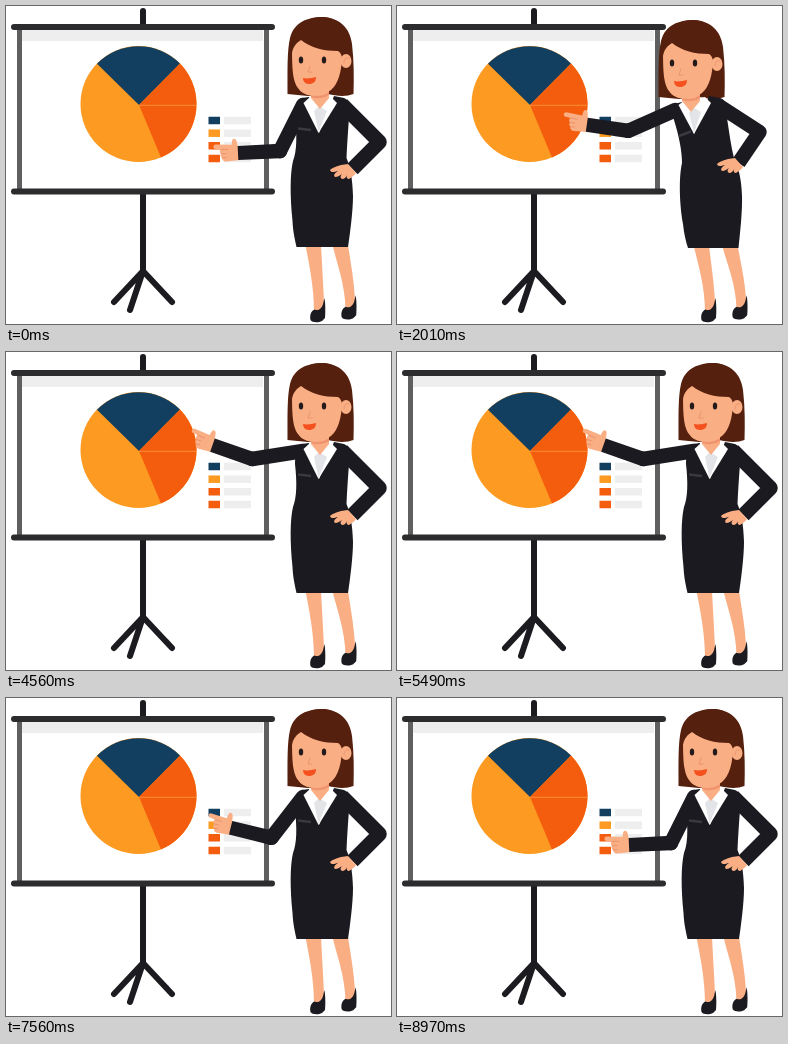
An HTML page for the animation above (9 s loop, 385 by 318 pixels).

```html
<!DOCTYPE html>
<html lang="en">
<head>
<meta charset="utf-8">
<title>Presenter</title>
<style>
@property --lean { syntax: "<number>"; inherits: false; initial-value: 0; }
@property --turn { syntax: "<angle>"; inherits: false; initial-value: 0deg; }

html, body { margin: 0; width: 100%; height: 100%; overflow: hidden; background: #fff; }
svg { display: block; width: 385px; height: 318px; }

.suit { fill: #1a1a20; }
.skin { fill: #faae84; }
.hair { fill: #55200e; }
.sleeve { fill: none; stroke: #1a1a20; stroke-width: 14.5; stroke-linejoin: round; }
.crease { fill: none; stroke: #e88f69; stroke-width: .8; stroke-linecap: round; }
.stand { fill: none; stroke: #2c2b2e; stroke-width: 6; stroke-linecap: round; stroke-linejoin: round; }
.legs { stroke: #1c1b20; }

.bend, .shift, .upper, .fore { animation: 9s ease-in-out infinite; }
.bend { d: var(--a); animation-name: bend; }
.shift { transform: translate(calc(var(--x) * var(--lean)), calc(var(--y) * var(--lean))); animation-name: shift; }
.upper, .fore { transform: rotate(var(--turn)); }
.upper { animation-name: upper; }
.fore { animation-name: fore; }
.eyes { transform-origin: 306px 54px; animation: blink 9s linear infinite; }

/* upright to leaning and back */
@keyframes bend {
  0%, 11.67%, 47.8%, 100% { d: var(--a); }
  20%, 37.8% { d: var(--b); }
}
@keyframes shift {
  0%, 11.67%, 47.8%, 100% { --lean: 0; }
  20%, 37.8% { --lean: 1; }
}
@keyframes upper {
  0%, 11.67% { --turn: -63.4deg; }
  20%, 37.8% { --turn: -23.8deg; }
  47.8% { --turn: -8.9deg; }
  80% { --turn: -8.9deg; animation-timing-function: ease-in; }
  84% { --turn: -52.2deg; animation-timing-function: ease-out; }
  88.9%, 100% { --turn: -63.4deg; }
}
@keyframes fore {
  0%, 11.67% { --turn: 60.7deg; }
  20%, 22.33% { --turn: 32deg; }
  37.8% { --turn: 24deg; }
  47.8% { --turn: 28.2deg; }
  80% { --turn: 28.2deg; animation-timing-function: ease-in; }
  84% { --turn: 65.9deg; animation-timing-function: ease-out; }
  88.9%, 100% { --turn: 60.7deg; }
}
@keyframes blink {
  0%, 69.4%, 70.6%, 100% { transform: scaleY(1); }
  70% { transform: scaleY(.1); }
}
</style>
</head>
<body>
<svg viewBox="0 0 385 318">
  <!-- board -->
  <path class="stand legs" d="M137 5V18M137 188V265L108 296M137 265L124 304M137 265L166 296"/>
  <path d="M16 24H257V182H16Z" fill="#fff"/>
  <path d="M16 24H257V35H16Z" fill="#eeeeef"/>
  <path d="M13.500 23V183M260.500 23V183" stroke="#5f5f60" stroke-width="5"/>
  <path class="stand" d="M8 21H266M8 185.500H266"/>

  <!-- chart -->
  <circle cx="132.5" cy="98" r="58" fill="#fd9a22"/>
  <path d="M133 99L91 57.800A58 58 0 0 1 174 57.500Z" fill="#123f5f"/>
  <path d="M133 99L174 57.500A58 58 0 0 1 155 151.500Z" fill="#f45d0e"/>
  <path d="M133 99.300H190" stroke="#fc9840" stroke-width=".8"/>

  <!-- legend -->
  <path d="M202.500 114.500h11.500" stroke="#123f5f" stroke-width="7.5"/>
  <path d="M202.500 127.200h11.500" stroke="#fd9a22" stroke-width="7.5"/>
  <path d="M202.500 139.800h11.500m-11.500 12.700h11.500" stroke="#f45d0e" stroke-width="7.5"/>
  <path d="M218 114.500h27m-27 12.700h27m-27 12.600h27m-27 12.700h27" stroke="#eeeeef" stroke-width="7.5"/>

  <!-- legs -->
  <path class="skin bend" style="--a:path('M299.5 239L315 239C316 258 317 275 318 296L317 306L308 306C308 280 303 258 299.5 239Z');
    --b:path('M296.5 239L312 239C314 258 317 275 318 296L317 306L308 306C308 280 301 258 296.5 239Z')"/>
  <path class="skin bend" style="--a:path('M326.5 239L342 239C345 258 348 275 349 293L348 303L339.5 303C339 278 331 258 326.5 239Z');
    --b:path('M325 239L340.5 239C344 258 348 275 349 293L348 303L339.5 303C339 278 330 258 325 239Z')"/>
  <path id="shoe" class="suit" d="M318.500 292C319.500 298 319.500 306 319 312L316 315C312 317 306 316.500 304.500 314C303.500 309 305 305 308.500 303.500C313 305.500 316.500 302 317.500 296Z"/>
  <use href="#shoe" x="31.2" y="-2.8"/>

  <!-- back of hair -->
  <g class="shift" style="--x:-20px;--y:3px">
    <path class="hair" d="M281.500 88C281.500 65 281 45 284 32C288 16 302 11 317 11C334 12 344 22 346 38C348 55 348 72 347.500 88C340 91 330 90 322 88L302 90Z"/>
  </g>

  <!-- body -->
  <path class="suit bend" style="--a:path('M303 91L296 92C291 95 289 104 289 112C291 130 291 145 287 155C284 168 284 190 286.5 215C287 226 289 234 290.5 241L342 241C344 228 347 205 347 190C346.5 172 344 160 340.5 152C341 140 342 125 343 112C346 100 343 94 338 92L328 90L313 127Z');
    --b:path('M289 95L281 97C276 101 275 108 277 114C282 130 285 145 285 157C282 170 282 195 286 218C287 228 289 236 291 242L341.5 242C343 228 345.5 205 345 190C344.5 172 341 160 337 152C334 140 332 125 330 112C331 100 329 94 323 92L312 90L297 128Z')"/>
  <path class="sleeve bend" style="--a:path('M336 98.5L373.500 136L346.5 163');--b:path('M320 98.5L362.5 126L341.5 157')"/>
  <g class="shift" style="--x:-4px;--y:-6px">
    <path class="skin" d="M342 158L335 159C331 160 326 162 324 164C325 167 328 166 332 165C329 167 327 169 329 171C332 171 334 169 336 168C334 170 334 172 336 173C339 173 340 171 341 169C340 171 341 173 343 173C346 171 349 169 350 167Z"/>
  </g>

  <!-- pointing arm -->
  <g transform="translate(297 99)">
    <g class="shift" style="--x:-18.5px;--y:5px">
      <g class="upper">
        <path class="sleeve" d="M0 0H-51.500" stroke-linecap="round"/>
        <g transform="translate(-51.5 0)">
          <g class="fore">
            <path class="skin" d="M-40 -6L-42 -7C-42.500 -10 -42.500 -14 -45 -14.500C-47.500 -15 -47.500 -11 -48 -8.500L-64 -9.500C-67 -9.500 -67 -5 -64 -5L-59 -4.500C-60.500 -4 -60.500 -1 -59 0C-60 1.500 -59 4 -58 4.500C-58 7 -56 8 -54 8L-40 7Z"/>
            <path class="crease" d="M-59 -4.500L-52 -4M-59 0L-54 0M-58 4.300L-54 4"/>
            <path class="suit" d="M0 -7.200L-42 -7V7L0 7.200Z"/>
            <circle class="suit" r="7.2"/>
          </g>
        </g>
      </g>
    </g>
  </g>

  <!-- shirt -->
  <path class="bend" fill="#fff" style="--a:path('M304 91L297.5 97L312.500 127L331 97L325 91Z');--b:path('M288 94L281.5 99L297 128L314 97L308 91Z')"/>
  <path class="bend" fill="#e3e4e7" style="--a:path('M308 105L313 100L321 105L312.500 126Z');--b:path('M292 107L297 102L304 106L297 127Z')"/>
  <path class="bend" fill="none" stroke="#393940" stroke-width="2.5" style="--a:path('M292 122.500L305 124');--b:path('M282 130L294 125.500')"/>

  <!-- head -->
  <g class="shift" style="--x:-20px;--y:3px">
    <path class="skin" d="M305 82H323V92L314 103L305 92Z"/>
    <path d="M305 88C311 91 318 90 323 86V89C317 93 310 93 305 91Z" fill="#ef946e"/>
    <path class="skin" d="M286 32C286 60 286 74 292 82C298 92 315 92 325 84C332 78 336 66 336 48L331 32Z"/>
    <path class="hair" d="M284 46C283 22 300 11 316 11C336 12 346 28 346 46L336 51C335 48 334 46 332 45C318 45 305 42 295 34C290 37 287 41 286 47Z"/>
    <ellipse class="skin" cx="340" cy="55" rx="5.5" ry="7"/>
    <path class="crease" d="M338 57C338 53 340 51 343 52"/>
    <g class="eyes" fill="#241a1c">
      <ellipse cx="295" cy="54" rx="2.2" ry="3.6"/>
      <ellipse cx="318" cy="54" rx="2.2" ry="3.6"/>
    </g>
    <path class="crease" d="M304 60L302 66H306"/>
    <path d="M297 72C301 73 306 72 310 71C310 76 307 78 303 78C299 78 297 75 297 72Z" fill="#f4511e"/>
  </g>
</svg>
</body>
</html>
```
